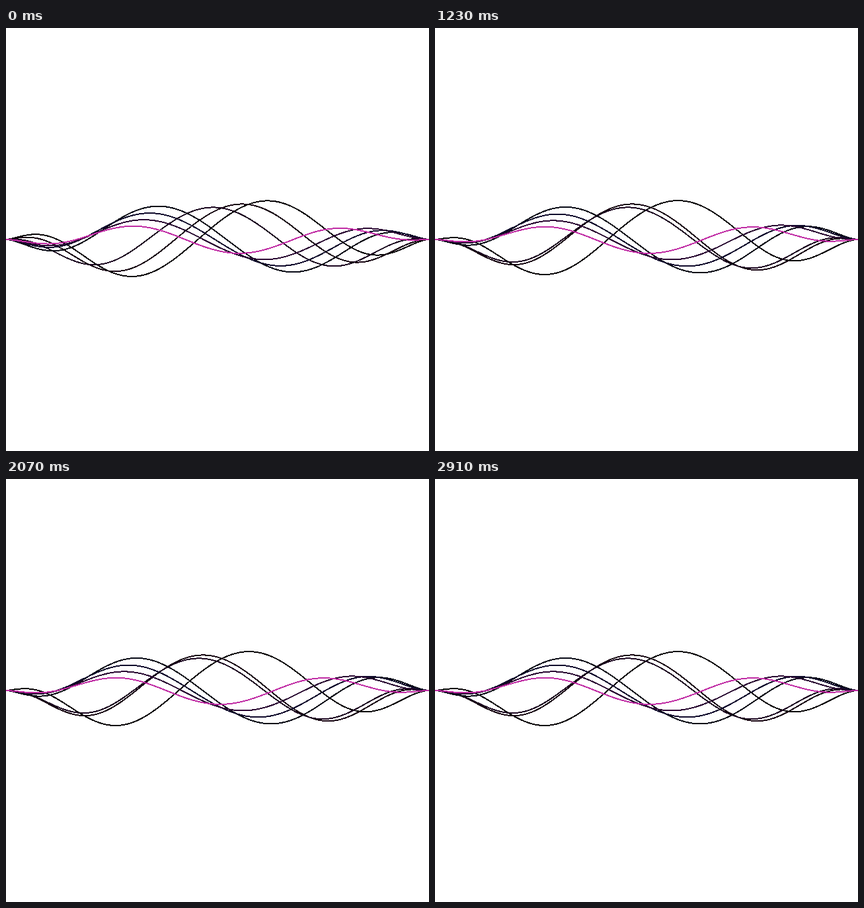
These frames come from a looping animation (640 px wide and 640 px high, 2.94 s). An HTML page:

```html
<!DOCTYPE html>
<html lang="en">
<head>
<meta charset="utf-8">
<title>Waves</title>
<style>
  html, body { margin: 0; width: 100%; height: 100%; overflow: hidden; background: #fff; }
  svg { display: block; width: 100%; height: 100%; }
  path { fill: none; stroke-width: 2; shape-rendering: crispEdges; }
</style>
</head>
<body>
<svg id="stage" viewBox="0 0 640 640"></svg>
<script>
const SIZE = 640, MID_Y = 319.9, STEP_MS = 30, CYCLE = 14;

// zero: x where the curve falls through the axis; back: its offset on the last step of a cycle
const waves = [
  { amp: 58.8, length: 426, zero: 503.5, back: 29, turns: 1, color: '#080406' },
  { amp: 53.5, length: 404, zero: 458, back: 59, turns: 2, color: '#180412' },
  { amp: 48.5, length: 395, zero: 412, back: 21.5, turns: 1, color: '#1c0620' },
  { amp: 50.8, length: 420, zero: 333.5, back: 36, turns: 1, color: '#080a16' },
  { amp: 40.5, length: 406, zero: 316, back: 35.5, turns: 1, color: '#100a2c' },
  { amp: 30.5, length: 372, zero: 298.5, back: 33, turns: 1, color: '#2a0832' },
  { amp: 21, length: 328, zero: 271, back: 29, turns: 1, color: '#c02ca4' }
];

const stage = document.getElementById('stage');
for (const wave of waves) {
  wave.path = document.createElementNS('http://www.w3.org/2000/svg', 'path');
  wave.path.setAttribute('stroke', wave.color);
  wave.speed = (wave.turns * wave.length - wave.back) / (CYCLE - 1);
  stage.append(wave.path);
}

// Flat in the middle, pinned at both ends
const envelope = x => (1 - (x / (SIZE / 2) - 1) ** 4) ** 1.6;

function outline(wave, step) {
  const zero = wave.zero + wave.speed * step;
  const points = [];
  for (let x = 0; x <= SIZE; x += 4) {
    const angle = (x - zero) / wave.length * 2 * Math.PI;
    points.push(x + ' ' + (MID_Y + wave.amp * envelope(x) * Math.sin(angle)).toFixed(2));
  }
  return 'M' + points.join('L');
}

function render(ms) {
  const step = Math.floor(ms / STEP_MS) % CYCLE;
  for (const wave of waves) wave.path.setAttribute('d', outline(wave, step));
}

const start = performance.now();
function tick() {
  render(performance.now() - start);
  requestAnimationFrame(tick);
}
tick();
</script>
</body>
</html>
```
